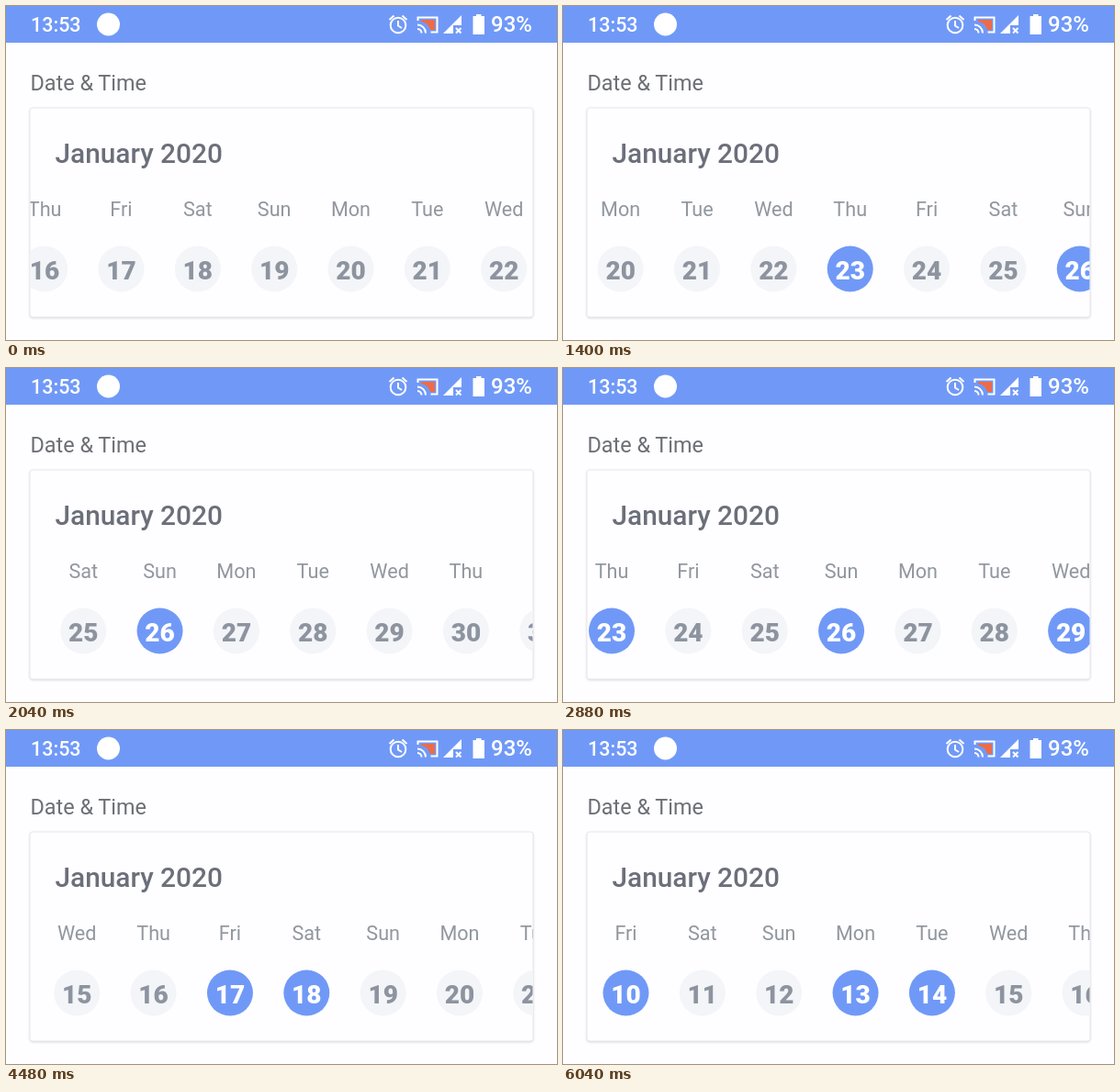
Write an HTML page that moves like this. It is 600 px wide and 364 px high and loops after 6440 ms.

```html
<!DOCTYPE html>
<html lang="en">
<head>
<meta charset="utf-8">
<title>Date strip</title>
<style>
  html, body { margin: 0; width: 100%; height: 100%; overflow: hidden; background: #fefdff; }
  svg { display: block; width: 100%; height: 100%; font-family: Roboto, sans-serif; }
  .card { fill: #fefdff; stroke: #e9e8ed; filter: drop-shadow(0 1px 1px #0002); }
  .status { font-weight: 500; fill: #fff; }
  .line { fill: none; stroke: #fff; stroke-width: 2; }
  .solid { fill: #fff; }
  #days { text-anchor: middle; }
  .name { font-size: 21.6px; fill: #91979f; }
  .num { font-size: 28px; font-weight: 800; fill: #8d949f; }
  .dot { fill: #f3f5f8; }
  .on .num { fill: #fff; }
  .on .dot { fill: #7099f7; }
</style>
</head>
<body>
<svg viewBox="0 0 600 364">
  <clipPath id="clip"><rect x="26.5" y="112" width="547" height="226"/></clipPath>

  <rect width="600" height="40" fill="#7099f7"/>
  <text class="status" x="27" y="28" font-size="21.5">13:53</text>
  <circle class="solid" cx="111.5" cy="20" r="12.5"/>
  <g class="line">
    <circle cx="427" cy="21" r="8.3"/>
    <path d="M427 16v5.5l4 2.5M417.5 15l5-4.5M436.5 15l-5-4.5"/>
  </g>
  <path d="M452 15h15v11h-5q-2-8-10-9z" fill="#ee6b48"/>
  <path class="line" d="M448.500 16v-3.500h21v16h-7M448 20.500a9 9 0 0 1 9 9M448 25a4.500 4.500 0 0 1 4.500 4.500"/>
  <path class="solid" d="M476 30L496 10V21H487V30z"/>
  <path class="line" d="M490 24l5.500 5.500m0-5.500l-5.500 5.500"/>
  <path class="solid" d="M512 9h5.500v2h3.500v20h-12.500v-20h3.500z"/>
  <text class="status" x="528" y="28" font-size="24">93%</text>

  <text x="26.5" y="92" font-size="23.4" fill="#6c6f76">Date &amp; Time</text>
  <rect class="card" x="26" y="111" width="548" height="228" rx="3"/>
  <text x="53.5" y="171" font-size="29.8" font-weight="500" fill="#6b6f7a">January 2020</text>
  <g clip-path="url(#clip)"><g id="days"></g></g>
</svg>
<script>
const LOOP = 6440, STEP = 40, PITCH = 83.35, START = 375.5;
const NAMES = ['Tue', 'Wed', 'Thu', 'Fri', 'Sat', 'Sun', 'Mon'];

// start, end, x of day 20 at the end, slowness of the start
const DRAGS = [
  [0, 680, 88, 1],
  [1360, 1720, -170, 1.36],
  [1840, 2120, -337.5, 0.56],
  [2720, 3120, 460, 2.6],
  [3440, 3680, 494, 1],
  [5280, 5920, 902, 1]
];

// each tap toggles a day
const TAPS = [[800, 23], [2400, 29], [3760, 18], [4480, 17], [4920, 18], [6040, 14]];
const PRESET = [10, 13, 26];

const strip = document.getElementById('days');
for (let d = 8; d <= 31; d++) {
  strip.innerHTML += `<g transform="translate(${(d - 20) * PITCH})" data-day="${d}">
    <text class="name" y="229">${NAMES[d % 7]}</text>
    <circle class="dot" cy="286.5" r="25"/>
    <text class="num" y="297.5">${d}</text></g>`;
}

function scrollAt(t) {
  return DRAGS.reduce((x, [start, end, to, slow]) => {
    const p = Math.min(1, Math.max(0, (t - start) / (end - start)));
    return x + (to - x) * (1 - (1 - p ** slow) ** 2);
  }, START);
}

function isOn(day, t) {
  const taps = TAPS.filter(([time, d]) => d === day && time <= t).length;
  return (taps + PRESET.includes(day)) % 2 === 1;
}

const origin = performance.now();
function draw(now) {
  const t = Math.floor(Math.max(0, now - origin) % LOOP / STEP) * STEP;
  strip.setAttribute('transform', `translate(${scrollAt(t)})`);
  for (const el of strip.children) el.classList.toggle('on', isOn(+el.dataset.day, t));
  requestAnimationFrame(draw);
}
draw(origin);
</script>
</body>
</html>
```
